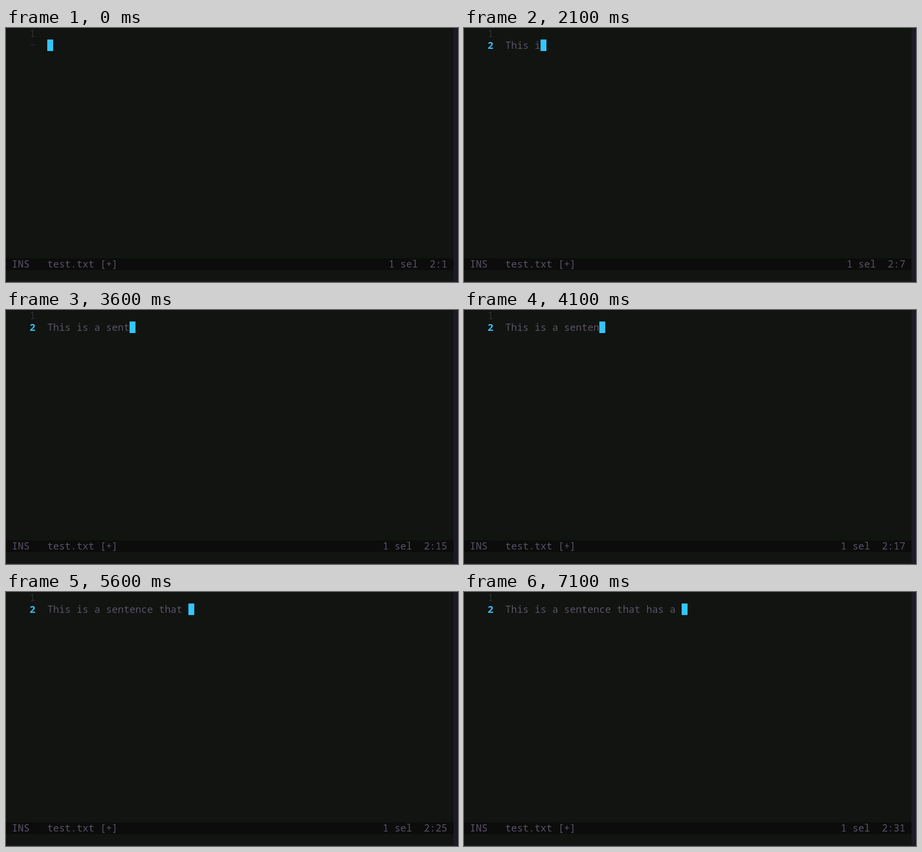
An HTML page that plays this animation: 997 px wide and 561 px high, repeating every 8000 ms.

```html
<!DOCTYPE html>
<html lang="en">
<head>
<meta charset="utf-8">
<title>Typing in a text editor</title>
<style>
  html, body { margin: 0; width: 100%; height: 100%; overflow: hidden; background: #111410; }
  svg { display: block; }
  text {
    font: 21.6px "Noto Sans Mono", "DejaVu Sans Mono", monospace;
    font-variant-ligatures: none;
    white-space: pre;
    fill: #5b5167;
  }
  .dim { fill: #2f2e38; }
  .current { fill: #38c3f5; font-weight: 600; }
</style>
</head>
<body>
<svg width="997" height="561" viewBox="0 0 997 561">
  <rect width="997" height="561" fill="#111410"/>
  <rect y="509" width="987" height="25.5" fill="#0b0c0b"/>
  <path d="M987 0h10v561H0v-2h987z" fill="#1d1a25"/>
  <text class="dim" x="52" y="20.4">1</text>
  <text id="gutter" x="52" y="45.8"></text>
  <text id="line" x="91" y="45.8"></text>
  <rect id="cursor" y="25.4" width="13" height="25.5" fill="#35c5fb"/>
  <text x="13" y="529">INS</text>
  <text x="91" y="529">test.txt [+]</text>
  <text id="position" x="973.5" y="529" text-anchor="end"></text>
</svg>
<script>
  const LOOP = 8000, CELL = 12.97, LEFT = 91;
  const sentence = "This is a sentence that has a ";
  // Time of each key press, in tenths of a second
  const keys = [
    13, 15, 16, 18, 19,
    21, 22, 24,
    26, 28,
    31, 33, 35, 36, 38, 40, 42, 44, 47,
    49, 50, 52, 54, 55,
    60, 62, 63, 66,
    68, 70
  ];
  const [gutter, line, cursor, position] =
    ["gutter", "line", "cursor", "position"].map(id => document.getElementById(id));
  const start = performance.now();
  let shown = -1;

  function show(count) {
    gutter.textContent = count ? "2" : "~";
    gutter.setAttribute("class", count ? "current" : "dim");
    line.textContent = sentence.slice(0, count);
    cursor.setAttribute("x", LEFT + count * CELL);
    position.textContent = `1 sel  2:${count + 1}`;
  }

  function tick() {
    const time = Math.max(0, performance.now() - start) % LOOP;
    const count = keys.filter(key => key * 100 <= time).length;
    if (count !== shown) show(shown = count);
    requestAnimationFrame(tick);
  }
  tick();
</script>
</body>
</html>
```
